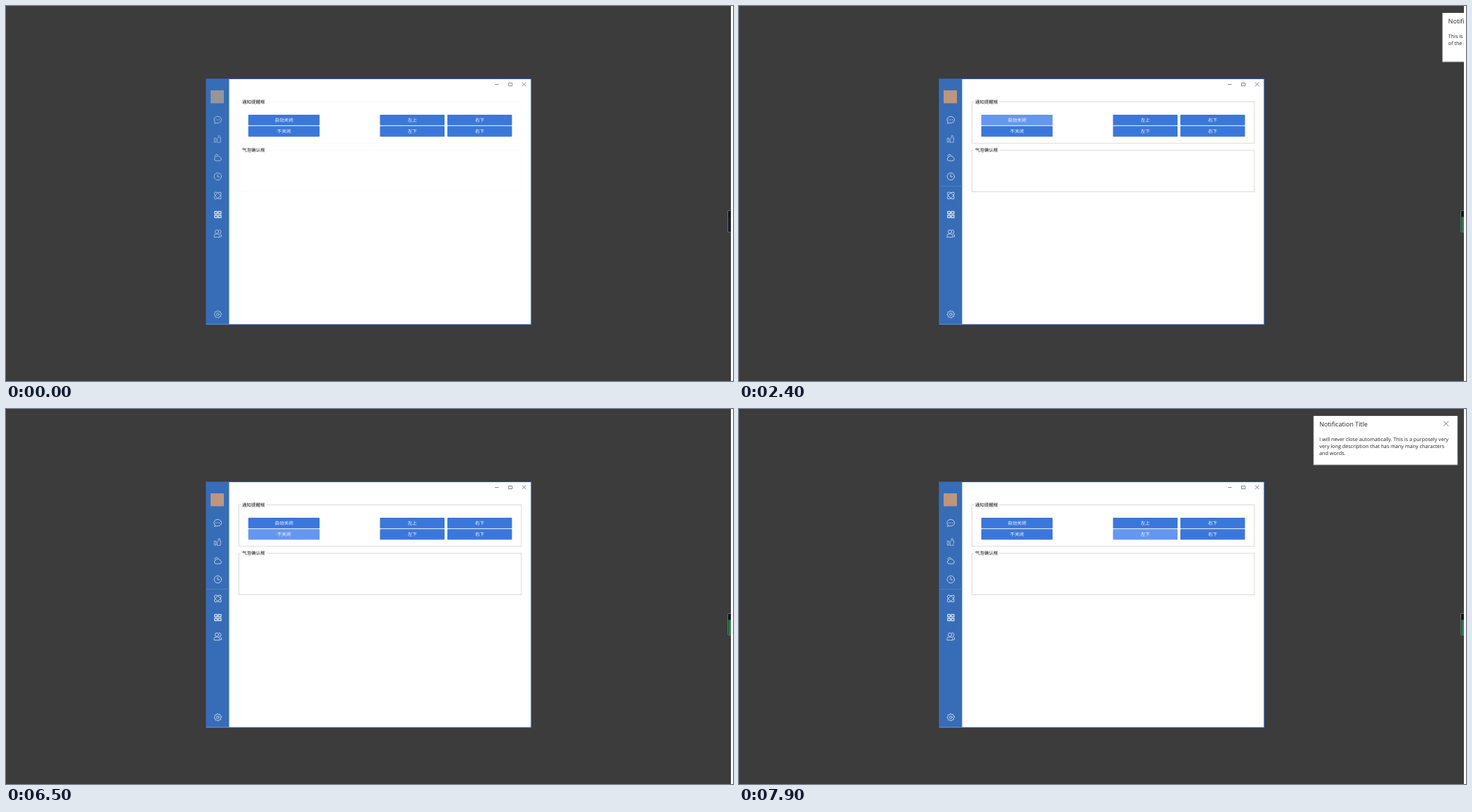
An HTML page that plays this animation: 1041x538 px, repeating every 8 s.

```html
<!DOCTYPE html>
<html lang="zh">
<head>
<meta charset="utf-8">
<style>
html, body { margin: 0; width: 100%; height: 100%; overflow: hidden; background: #fff; }
svg { display: block; width: 1041px; height: 538px; }
text { font-family: "Noto Sans CJK SC", "Noto Sans CJK", sans-serif; font-size: 6.6px; text-rendering: geometricPrecision; }
.note text { font-family: "Open Sans", sans-serif; font-size: 7.27px; fill: #222; }
.note .title { font-size: 9.05px; }
.line { fill: none; stroke-width: .85; stroke-linecap: round; stroke-linejoin: round; }
</style>
</head>
<body>
<svg viewBox="0 0 1041 538">
  <defs><clipPath id="screen"><rect width="1038" height="538"/></clipPath></defs>
  <rect width="1041" height="538" fill="#fff"/>
  <rect width="1038" height="538" fill="#3c3c3c"/>

  <rect x="286.5" y="104.5" width="465.5" height="352.5" fill="#fff" stroke="#2f5fae"/>
  <rect x="287" y="105" width="32.5" height="351.5" fill="#376db6"/>
  <path id="divider" d="M287 258.5H319.5" stroke="#5388bd" stroke-width=".8"/>
  <rect id="avatar" x="293" y="121" width="19" height="18.5"/>

  <g id="icons" class="line">
    <path d="M299.4 166.6A5.4 4.7 0 1 1 302 167.8L298.6 168.2Z"/>
    <path d="M300.6 163.2h.3M303 163.2h.3M305.5 163.2h.3" stroke-width="1.1"/>
    <path d="M298.6 189.5h2.1v5.8h-2.1zM302.4 195.3V190.5L304.2 189V186.2Q306.4 184.8 306.4 187.4V189.4H307.8L307 195.3Z" stroke-width=".65"/>
    <path d="M300.4 222A2.6 2.6 0 0 1 300.2 217A3.6 3.6 0 0 1 306.8 217.4A2.4 2.4 0 0 1 306.4 222ZM299 216A2.6 2.6 0 0 1 303.3 213.6"/>
    <circle cx="303.3" cy="244.5" r="5.2"/>
    <path d="M303 241.5V245H305.5"/>
    <g id="atom"></g>
    <path d="M298.9 294.7h3.6v3.6h-3.6zM304.3 294.7h3.6v3.6h-3.6zM298.9 300.2h3.6v3.6h-3.6zM304.3 300.2h3.6v3.6h-3.6z" stroke="#fff" stroke-width="1.1"/>
    <circle cx="302" cy="323.8" r="2.6"/>
    <path d="M298 331.3V329.6Q298 327 301 327H303Q306 327 306 329.6V331.3ZM305 321.3A2.4 2.4 0 0 1 306 326L308.5 328.4V331H307.2"/>
    <path id="gear"/>
    <circle cx="303.3" cy="442.3" r="1.8"/>
  </g>

  <g id="controls" class="line">
    <path d="M700.5 112.5H705M720 110.5H724.8V114.5H720Z"/>
    <path d="M739.3 109.8L744.5 115M744.5 109.8L739.3 115"/>
  </g>

  <g id="groups" fill="none" stroke="#d9d9d9" stroke-width="1">
    <path d="M336.5 137.5H333.5V197H738V137.5H372.5"/>
    <path d="M336.5 207H333.5V266.5H738V207H372.5"/>
  </g>
  <g fill="#151515">
    <text x="338" y="139.8">通知提醒框</text>
    <text x="338" y="209.2">气泡确认框</text>
  </g>
  <g id="buttons" fill="#fff" text-anchor="middle"></g>

  <g id="widget">
    <rect x="1033.5" y="293.5" width="6" height="31" rx="1.5" fill="#14171c" stroke="#777d86" stroke-width=".8"/>
    <rect id="meter" x="1034.5" y="302.5" width="4" height="21.5"/>
  </g>
  <rect x="1038" width="3" height="538" fill="#fff"/>

  <g clip-path="url(#screen)">
    <g id="note" class="note">
      <rect x="-.7" y="-.2" width="207" height="70.9" fill="#909090"/>
      <rect width="205.5" height="69.7" fill="#fff"/>
      <text class="title" x="8" y="14.9">Notification Title</text>
      <g id="body"></g>
      <path d="M186 7.5L193 14.5M193 7.5L186 14.5" stroke="#666" stroke-width=".9"/>
    </g>
  </g>
</svg>
<script>
const NS = "http://www.w3.org/2000/svg";
const $ = id => document.getElementById(id);
const clamp = v => Math.max(0, Math.min(1, v));
const mix = (a, b, k) => `rgb(${a.map((v, i) => Math.round(v + (b[i] - v) * k))})`;

function add(parent, tag, attrs, label) {
  const el = document.createElementNS(NS, tag);
  for (const key in attrs) el.setAttribute(key, attrs[key]);
  if (label) el.textContent = label;
  parent.appendChild(el);
  return el;
}

const BLUE = [59, 119, 218], LIGHT = [101, 151, 240];
const makeButton = (x, y, w, label) => {
  const rect = add($("buttons"), "rect", { x, y, width: w, height: 15.2, rx: .8 });
  add($("buttons"), "text", { x: x + w / 2, y: y + 10.1 }, label);
  return rect;
};
const autoBtn = makeButton(347, 156, 102, "自动关闭");
const stayBtn = makeButton(347, 172.3, 102, "不关闭");
const leftBtn = makeButton(535.5, 172.3, 92.5, "左下");
[makeButton(535.5, 156, 92.5, "左上"), makeButton(632, 156, 92.5, "右下"), makeButton(632, 172.3, 92.5, "右下")]
  .forEach(b => b.setAttribute("fill", mix(BLUE, BLUE, 0)));

for (const turn of [45, -45])
  add($("atom"), "ellipse", { cx: 303.3, cy: 272, rx: 6.3, ry: 3, transform: `rotate(${turn} 303.3 272)` });

const teeth = Array.from({ length: 32 }, (_, i) => {
  const a = i * Math.PI / 16, r = 4.7 + .6 * Math.sign(Math.cos(8 * a + .4));
  return `${(303.3 + r * Math.cos(a)).toFixed(2)} ${(442.3 + r * Math.sin(a)).toFixed(2)}`;
});
$("gear").setAttribute("d", `M${teeth.join("L")}Z`);

const bodies = [
  ["This is the content of the notification. This is the content",
   "of the notification. This is the content of the notification."],
  ["I will never close automatically. This is a purposely very",
   "very long description that has many many characters", "and words."]
].map(lines => {
  const g = add($("body"), "g", {});
  lines.forEach((s, i) => add(g, "text", { x: 8, y: 35.7 + i * 10.3 }, s));
  return g;
});

// Two-step fade: half at the start time, complete 100 ms later.
const fade = (t, start) => clamp((t - start + 100) / 200);
const hover = (btn, k) => btn.setAttribute("fill", mix(BLUE, LIGHT, k));

function draw(ms) {
  const t = Math.floor(ms / 100) * 100;

  const warm = clamp(t / 900);
  $("groups").setAttribute("opacity", .12 + .88 * warm);
  $("divider").setAttribute("opacity", warm);
  $("icons").setAttribute("stroke", mix([178, 202, 232], [214, 226, 242], warm));
  $("controls").setAttribute("stroke", mix([104, 124, 172], [105, 109, 118], warm));
  $("avatar").setAttribute("fill", mix([150, 150, 152], [190, 150, 125], warm));
  $("meter").setAttribute("fill", mix([26, 32, 46], [38, 128, 70], warm));

  const press = t === 2300 ? .5 : 1;
  hover(autoBtn, press * (fade(t, 1100) - fade(t, 3000)));
  hover(stayBtn, fade(t, 500) - fade(t, 1000) + fade(t, 3500) - fade(t, 7600));
  hover(leftBtn, fade(t, 7800));

  const second = t >= 7200;
  const start = second ? 7240 : 2340;
  const shown = t > start && (second || t < 6500);
  const x = Math.max(823, 1038 - (t - start) * .506);
  $("note").setAttribute("visibility", shown ? "visible" : "hidden");
  $("note").setAttribute("transform", `translate(${x.toFixed(1)} 10)`);
  bodies.forEach((g, i) => g.setAttribute("display", i === +second ? "inline" : "none"));
}

const begin = performance.now();
function tick() {
  draw((performance.now() - begin) % 8000);
  requestAnimationFrame(tick);
}
tick();
</script>
</body>
</html>
```
